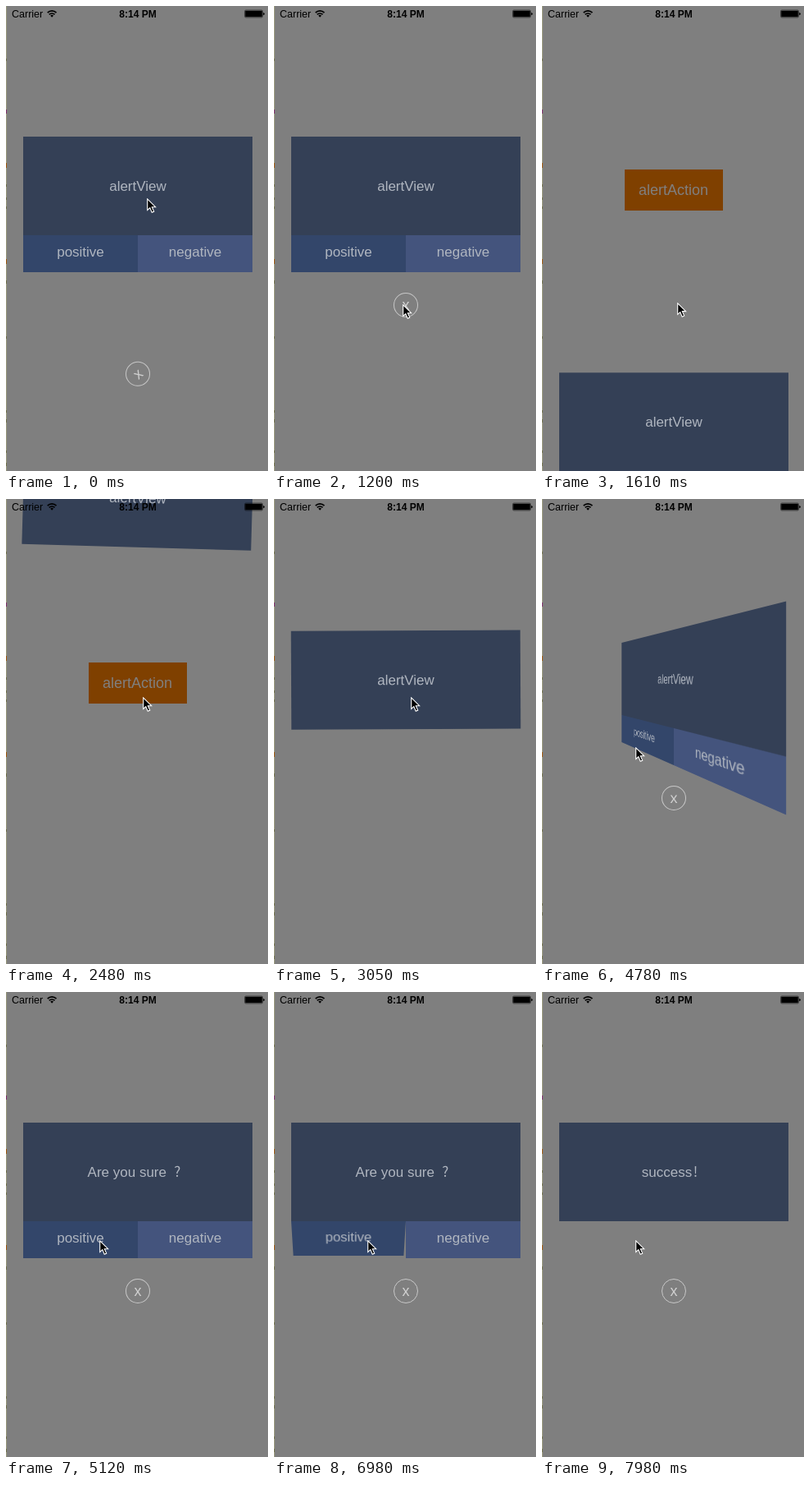
Animation, 320 px wide and 566 px high, one loop 8000 ms. Source, as an HTML page:

```html
<!DOCTYPE html>
<html lang="en">
<head>
<meta charset="utf-8">
<style>
html, body { margin: 0; width: 100%; height: 100%; overflow: hidden; }
body { position: relative; background: #fff; font: 17px "Liberation Sans", Arial, sans-serif; }
div, svg { position: absolute; white-space: nowrap; }
.box { text-align: center; color: #b0b6c0; }
#action { left: 101px; top: 199px; width: 119px; height: 50px; padding-right: 1px; background: #ff8000; color: #fff; font-size: 18px; line-height: 50px; }
#dim { inset: 0; background: #000; }
#alert { left: 21px; top: 159px; width: 280px; height: 120px; }
#message { inset: 0; line-height: 122px; background: #344056; }
.button { top: 120px; width: 140px; height: 45px; line-height: 41px; transform-origin: 50% 0; }
#positive { left: 0; background: #33466a; }
#negative { left: 140px; background: #44547d; }
#close { left: 146px; top: 349px; width: 28px; height: 28px; border: 1px solid #c8c8c8; border-radius: 50%; color: #d0d0d0; font-size: 18px; line-height: 28px; }
i { display: inline-block; width: 17px; line-height: 1; font: 300 17px/1 "Noto Sans CJK SC", "Noto Sans CJK", sans-serif; }
.left { text-align: left; text-indent: 1.5px; }
#status { inset: 0; }
#cursor { left: 0; top: 0; }
</style>
</head>
<body>
<div id="action" class="box">alertAction</div>
<div id="dim"></div>
<div id="alert">
  <div id="message" class="box"></div>
  <div id="positive" class="box button">positive</div>
  <div id="negative" class="box button">negative</div>
</div>
<div id="close" class="box">x</div>
<svg id="status" width="320" height="566" font-size="12.5">
  <path d="M.5 0V566" stroke="#98987c"/>
  <path d="M.5 126v5" stroke="#80306c"/>
  <path d="M.5 191v6M.5 308v6" stroke="#a05a10"/>
  <path d="M.5 64v3M.5 217v3M.5 233v3M.5 244v3M.5 334v4M.5 402v3M.5 492v3M.5 503v4M.5 541v3M.5 556v4" stroke="#70704c"/>
  <text x="7" y="13.5">Carrier</text>
  <text x="161" y="13.5" text-anchor="middle" font-weight="bold" font-size="12">8:14 PM</text>
  <path d="M50.7 8.2a7.6 7.6 0 0 1 10.8 0M52.7 10.4a4.8 4.8 0 0 1 6.8 0" fill="none" stroke="#000" stroke-width="1.7"/>
  <path d="M56.1 13.8l-1.9-2a2.7 2.7 0 0 1 3.8 0z"/>
  <rect x="291.5" y="5" width="22" height="9" rx="1.5" fill="none" stroke="#000" stroke-width=".5"/>
  <rect x="292.2" y="5.7" width="20.6" height="7.6" rx=".8"/>
  <path d="M314.2 8a1.5 1.5 0 0 1 0 3.2z"/>
</svg>
<svg id="cursor" width="14" height="20">
  <path d="M.7 .9V14.4L3.8 11.6L6.2 17.2L8.7 16.1L6.3 10.7H10.6Z" stroke="#fff" stroke-width="1.1"/>
</svg>
<script>
const LOOP = 8000, FALL = 1351, SHOW = 2456, CLOSE_IN = 3546;
const el = id => document.getElementById(id);
const [dim, alertBox, message, positive, negative, closeButton, cursor] =
  ['dim', 'alert', 'message', 'positive', 'negative', 'close', 'cursor'].map(el);

const MESSAGES = [
  'alertView',
  'Are you sure&nbsp;<i>?</i>&nbsp;',
  'success<i class="left">!</i>'
];

// time, x, y
const CURSOR_PATH = [
  [0, 172, 234], [420, 172, 235], [620, 176, 258], [810, 179, 295],
  [1000, 171, 342], [1200, 157, 363], [1380, 160, 363], [1610, 165, 361],
  [1750, 165, 355], [1980, 165, 308], [2180, 166, 258], [2240, 167, 247],
  [2300, 167, 241], [3850, 167, 241], [4080, 144, 278], [4360, 114, 302], [LOOP, 114, 302]
];

const progress = (t, start, duration) => Math.min(1, Math.max(0, (t - start) / duration));
const ease = u => u * u * (3 - 2 * u);

// Damped snap: remaining distance and swing angle
function snap(ms, distance, swing) {
  const s = Math.max(0, ms) / 1000;
  return {
    y: distance * Math.exp(-9 * s) * Math.cos(6 * s),
    angle: swing * Math.exp(-6 * s) * Math.sin(7 * s)
  };
}

const fall = t => ({ y: 4250 * ((t - FALL) / 1000) ** 2, angle: 0 });

// Tilts the panel to 60 degrees and back
function flip(t, start) {
  const u = progress(t, start, 500);
  return 60 * ease(1 - Math.abs(2 * u - 1));
}

function foldButton(node, t, opening, folding) {
  let folded = 0;
  if (t >= SHOW) folded = t < 5000 ? 1 - ease(progress(t, opening, 85)) : ease(progress(t, folding, 190));
  node.style.visibility = folded >= 1 ? 'hidden' : 'visible';
  node.style.transform = folded ? `perspective(300px) rotateX(${-90 * folded}deg)` : 'none';
}

function moveCursor(t) {
  const i = CURSOR_PATH.findIndex(p => p[0] > t);
  const [t0, x0, y0] = CURSOR_PATH[i - 1], [t1, x1, y1] = CURSOR_PATH[i];
  const u = (t - t0) / (t1 - t0);
  cursor.style.transform = `translate(${x0 + (x1 - x0) * u}px, ${y0 + (y1 - y0) * u}px)`;
}

let shown = -1;
function render(t) {
  const panel = t < FALL ? { y: 0, angle: 0 } : t < SHOW ? fall(t) : snap(t - SHOW, -279, 11);
  const tilt = flip(t, 4590) + flip(t, 7475);
  alertBox.style.transform =
    `translateY(${panel.y}px) rotate(${panel.angle}deg)` +
    (tilt ? ` perspective(300px) rotateY(${-tilt}deg)` : '');

  const current = t < 4840 ? 0 : t < 7725 ? 1 : 2;
  if (current !== shown) message.innerHTML = MESSAGES[shown = current];

  foldButton(positive, t, 3075, 6932);
  foldButton(negative, t, 3310, 7155);

  const knob = t < FALL ? snap(t + 88, 217, -122)
    : t < SHOW ? fall(t) : snap(t - CLOSE_IN, 217, -122);
  closeButton.style.transform = `translateY(${knob.y}px) rotate(${knob.angle}deg)`;

  dim.style.opacity = t < SHOW ? 0.5 * (1 - ease(progress(t, 1660, 490))) : 0.5;
  moveCursor(t);
}

function tick() {
  render(performance.now() % LOOP);
  requestAnimationFrame(tick);
}
tick();
</script>
</body>
</html>
```
